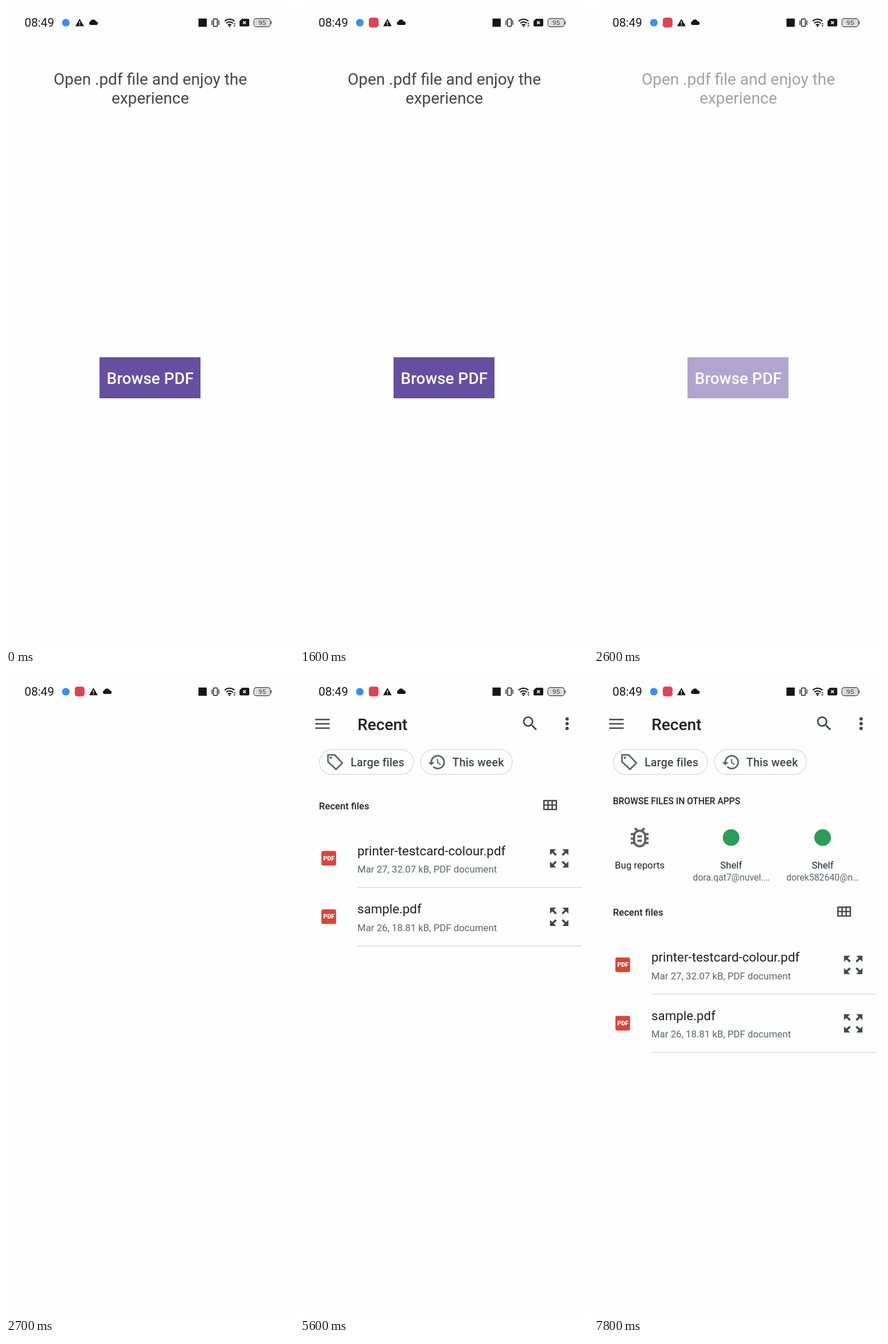
These frames come from a looping animation (502 px wide and 1116 px high, 8000 ms). An HTML page:

```html
<!DOCTYPE html>
<html lang="en">
<head>
<meta charset="utf-8">
<title>Browse PDF</title>
<style>
html, body { margin: 0; width: 100%; height: 100%; overflow: hidden; background: #fefefe; }
svg { display: block; width: 502px; height: 1116px; font-family: Roboto, sans-serif; }
.mid { text-anchor: middle; }
.medium { font-weight: 500; }
.chip { fill: none; stroke: #dadce0; stroke-width: 1.4; }
.chip-label { font-size: 19.5px; letter-spacing: .01em; font-weight: 500; fill: #44474a; }
.label { font-size: 16.8px; fill: #202124; }
.meta { font-size: 16.8px; fill: #5f6368; }
.mail { font-size: 15.8px; fill: #5f6368; }
</style>
</head>
<body>
<svg viewBox="0 0 502 1116">
  <defs>
    <path id="search" d="M15.5 14h-.79l-.28-.27A6.471 6.471 0 0 0 16 9.5 6.5 6.5 0 1 0 9.5 16c1.61 0 3.09-.59 4.23-1.57l.27.28v.79l5 4.99L20.49 19l-4.99-5zm-6 0C7.01 14 5 11.99 5 9.5S7.01 5 9.5 5 14 7.01 14 9.5 11.99 14 9.5 14z"/>
    <g id="tag" fill="none" stroke="currentColor" stroke-width="2" stroke-linejoin="round">
      <path d="M3 3h8.5l9.5 10-8 8-10-9.5z"/>
      <circle cx="6.5" cy="6.5" r="1.5" fill="currentColor" stroke="none"/>
    </g>
    <path id="history" d="M13 3a9 9 0 0 0-9 9H1l3.89 3.89.07.14L9 12H6c0-3.87 3.13-7 7-7s7 3.13 7 7-3.13 7-7 7c-1.93 0-3.68-.79-4.94-2.06l-1.42 1.42A8.954 8.954 0 0 0 13 21a9 9 0 0 0 0-18zm-1 5v5l4.28 2.54.72-1.21-3.5-2.08V8H12z"/>
    <g id="bug" fill="none" stroke="currentColor" stroke-width="2">
      <rect x="7" y="6" width="10" height="14" rx="5"/>
      <path d="M4 9h3.6M4 13h3M4 17h3.6M20 9h-3.6M20 13h-3M20 17h-3.6M10 11h4M10 15h4M7.7 3.7l2.6 2.6M16.3 3.7l-2.6 2.6"/>
    </g>
    <path id="arrow" d="M-9-9h6l-2.3 2.3 2.9 2.9-1.4 1.4-2.9-2.9L-9-3z"/>
    <g id="expand" fill="#44474a">
      <use href="#arrow"/><use href="#arrow" transform="rotate(90)"/>
      <use href="#arrow" transform="rotate(180)"/><use href="#arrow" transform="rotate(270)"/>
    </g>
  </defs>

  <g id="home" class="mid" font-size="27.95">
    <g fill="#49454f">
      <text x="251.5" y="137">Open .pdf file and enjoy the</text>
      <text x="251.5" y="170">experience</text>
    </g>
    <path d="M163 611.5h176v71.5h-176z" fill="#664fa1"/>
    <text class="medium" x="251.3" y="658" fill="#fff">Browse PDF</text>
  </g>

  <path id="edge" d="M0 9h502" stroke="#dedede" stroke-width="1.3"/>
  <g id="picker" fill="#44474a" color="#44474a">
    <path d="M26.5 77.5h25.2M26.5 85h25.2M26.5 92.5h25.2" stroke="#44474a" stroke-width="2.5"/>
    <text class="medium" x="100.3" y="95.5" font-size="28" fill="#202124">Recent</text>
    <g id="actions">
      <use href="#search" transform="translate(384.4 67.8) scale(1.394)"/>
      <circle cx="465.6" cy="76.4" r="2.9"/><circle cx="465.6" cy="84.7" r="2.9"/><circle cx="465.6" cy="93" r="2.9"/>
    </g>
    <rect class="chip" x="34" y="129.7" width="164" height="43.6" rx="21.8"/>
    <rect class="chip" x="210.2" y="129.7" width="160" height="43.6" rx="21.8"/>
    <g fill="#5f6368" color="#5f6368">
      <use href="#tag" transform="translate(44.6 135) scale(1.394)"/>
      <use href="#history" transform="translate(222 135) scale(1.394)"/>
    </g>
    <text class="chip-label" x="88.3" y="158.5">Large files</text>
    <text class="chip-label" x="265.6" y="158.5">This week</text>

    <g id="apps" color="#5f6368">
      <text class="medium" x="33" y="224.5" font-size="15.6" fill="#202124">BROWSE FILES IN OTHER APPS</text>
      <use href="#bug" transform="translate(56.3 259.5) scale(1.94)"/>
      <circle cx="239" cy="283" r="14.5" fill="#2a9d56"/>
      <circle cx="398.5" cy="283" r="14.5" fill="#2a9d56"/>
      <g class="mid">
        <text class="label" x="79.7" y="337.3">Bug reports</text>
        <text class="label" x="239" y="337.3">Shelf</text>
        <text class="label" x="398.5" y="337.3">Shelf</text>
        <text class="mail" x="239" y="358.3">dora.qat7@nuvel.…</text>
        <text class="mail" x="398.5" y="358.3">dorek582640@n…</text>
      </g>
    </g>

    <g id="list">
      <text class="medium" x="33" y="233.7" font-size="16.7" fill="#202124">Recent files</text>
      <path d="M425.2 218.7h21.6v15.4h-21.6zM425.2 226.4h21.6M432.4 218.7v15.4M439.6 218.7v15.4" fill="none" stroke="#44474a" stroke-width="2.4"/>
    </g>
  </g>

  <g id="status" fill="#161616">
    <text x="32.2" y="36.3" font-size="20.8">08:49</text>
    <circle cx="104.3" cy="29" r="6.6" fill="#3b8df2"/>
    <rect id="recorder" x="-8.5" y="-8.5" width="17" height="17" rx="4.5" fill="#e5404f"/>
    <g id="warning">
      <path d="M0-6.7L7.5 6.2h-15z"/>
      <path d="M0-2.2v4M0 3v1.8" stroke="#fefefe" stroke-width="1.6"/>
    </g>
    <path id="cloud" d="M-4.4 4.2a3.2 3.2 0 0 1-.7-6.3 5 5 0 0 1 9.4.3 2.9 2.9 0 0 1 .6 6z"/>
    <rect x="335.5" y="21.8" width="14.4" height="14.4"/>
    <g fill="none" stroke="#161616" stroke-width="1.5">
      <rect x="361.6" y="22.6" width="6.8" height="13" rx="1.4"/>
      <path d="M358.5 25l1 1.6-1 1.6 1 1.6-1 1.6 1 1.6M371.5 25l-1 1.6 1 1.6-1 1.6 1 1.6-1 1.6" stroke-width="1.2"/>
      <path d="M381.3 26.4a12.4 12.4 0 0 1 16.8 0M384 30a8.4 8.4 0 0 1 11.4 0M386.7 33.2a4.5 4.5 0 0 1 6 0" stroke-width="2"/>
      <rect x="432.2" y="22" width="28.4" height="14" rx="4.2" stroke-width="1.3" stroke="#444"/>
      <path d="M462.3 26.6v4.8" stroke="#444" stroke-width="1.4"/>
    </g>
    <circle cx="389.7" cy="35" r="1.5"/>
    <path d="M396.2 31.8l2-2.3 2 2.3zM396.2 33.7l2 2.3 2-2.3z"/>
    <path d="M411.3 22.2h10.9a1.8 1.8 0 0 1 1.8 1.8v9.8a1.8 1.8 0 0 1-1.8 1.8h-13.4a1.8 1.8 0 0 1-1.8-1.8v-7.4z"/>
    <path d="M413.2 26.6l4.8 4.8M418 26.6l-4.8 4.8" stroke="#fff" stroke-width="1.7"/>
    <rect x="434" y="23.8" width="24.8" height="10.4" rx="2.8" fill="#d9d9d9"/>
    <text class="mid" x="446.4" y="33.2" font-size="11.6" fill="#444">95</text>
  </g>
</svg>
<script>
const LOOP = 8000, TICK = 100;
const $ = id => document.getElementById(id);
const clamp = v => Math.min(1, Math.max(0, v));
const progress = (t, from, to) => clamp((t - from) / (to - from));
const show = (id, opacity) => $(id).setAttribute('opacity', opacity);
const place = (id, x, y, scale = 1) =>
  $(id).setAttribute('transform', `translate(${x} ${y}) scale(${scale})`);

const files = [
  ['printer-testcard-colour.pdf', 'Mar 27, 32.07 kB, PDF document'],
  ['sample.pdf', 'Mar 26, 18.81 kB, PDF document']
];
files.forEach(([name, meta], i) => $('list').insertAdjacentHTML('beforeend', `
  <g transform="translate(0 ${i * 101.7})">
    <rect x="37.3" y="306.3" width="25.6" height="25.4" rx="3" fill="#db4437"/>
    <text class="mid" x="50.3" y="322.8" font-size="10.6" font-weight="900" fill="#fff">PDF</text>
    <text x="100" y="313.5" font-size="22.3" fill="#202124">${name}</text>
    <text class="meta" x="100" y="344">${meta}</text>
    <use href="#expand" transform="translate(451.8 319.2) scale(1.78)"/>
    <path d="M100.5 370h390.5" stroke="#dadce0" stroke-width="1.4"/>
  </g>`));

function draw(t) {
  // The new icon and the warning sign settle from opposite sides.
  const gap = 24 * (1 - progress(t, 600, 1200)) ** 1.75;
  const cloudGap = 24 * (1 - progress(t, 200, 900)) ** 2;
  place('recorder', 128.4 + gap, 28.8, progress(t, 700, 1000));
  place('warning', 152.4 - gap, 29);
  place('cloud', 176.5 - cloudGap, 28.8);

  show('home', 1 - progress(t, 2500, 2700));

  const entering = t < 5300;
  show('edge', +(t >= 5200 && entering));
  show('picker', t < 5200 ? 0 : entering ? .32 : 1);
  place('picker', 0, entering ? 8.7 : 0);
  show('actions', +!entering);
  show('list', +(t >= 5500));
  const expanded = t >= 5700;
  show('apps', +expanded);
  place('list', 0, expanded ? 185.5 : 0);
}

const start = performance.now();
function loop(now) {
  const t = Math.max(0, now - start) % LOOP;
  draw(Math.floor(t / TICK) * TICK);
  requestAnimationFrame(loop);
}
draw(0);
requestAnimationFrame(loop);
</script>
</body>
</html>
```
